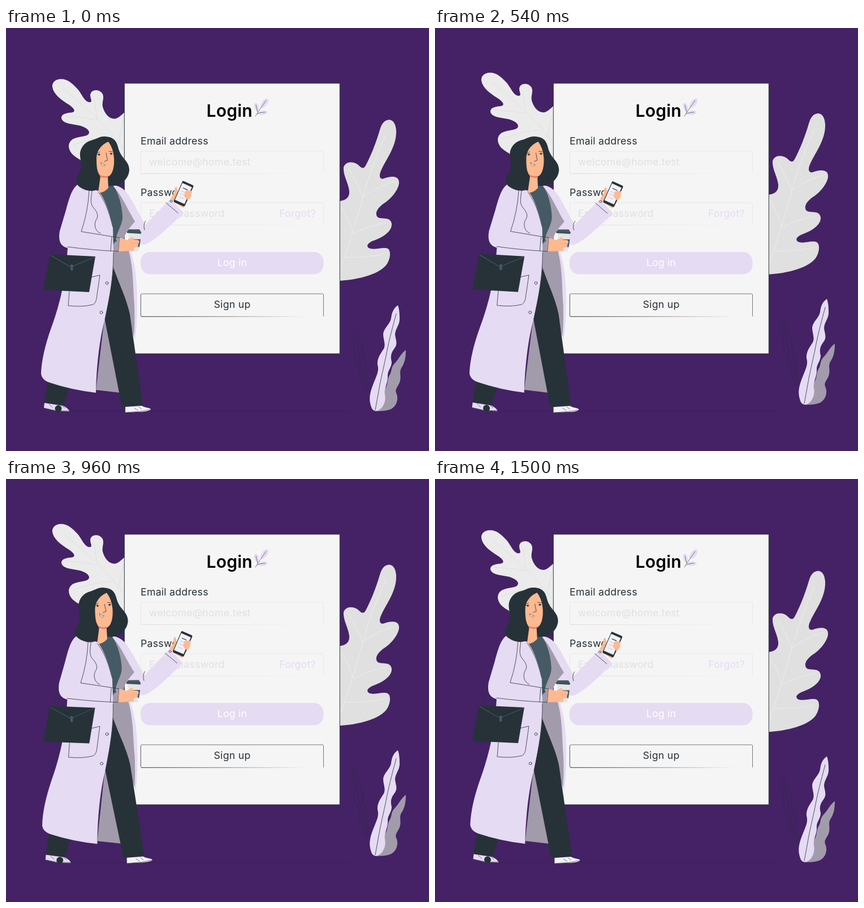
These frames come from a looping animation (748x748 px, 1540 ms). An HTML page:

```html
<!DOCTYPE html>
<html lang="en">
<head>
<meta charset="utf-8">
<title>Login</title>
<style>
  html, body { margin: 0; width: 100%; height: 100%; overflow: hidden; background: #442265; }
  svg { display: block; width: 100%; height: 100%; }
  text { font: 17.7px Inter, "Open Sans", sans-serif; letter-spacing: .25px; fill: #263238; }
  .mid { text-anchor: middle; }
  .hint { fill: #e0e0e0; }
  .lav { fill: #e5dbf2; }
  .dark { fill: #263238; }
  .teal { fill: #455a64; }
  .shade { fill: #a29bab; }
  .skin { fill: #ffb991; }
  .white { fill: #f3f1f6; }
  .line { fill: none; stroke: #263238; stroke-width: .8; stroke-linecap: round; stroke-linejoin: round; }
  .thin { stroke-width: .6; }
</style>
</head>
<body>
<svg viewBox="0 0 748 748">
  <defs>
    <linearGradient id="fadeDark" gradientUnits="userSpaceOnUse" x1="238" y1="0" x2="530" y2="0">
      <stop stop-color="#263238"/><stop offset=".45" stop-color="#777"/><stop offset="1" stop-color="#f5f5f5"/>
    </linearGradient>
    <linearGradient id="fadeLight" gradientUnits="userSpaceOnUse" x1="238" y1="0" x2="550" y2="0">
      <stop stop-color="#dcdcdc"/><stop offset="1" stop-color="#f5f5f5"/>
    </linearGradient>
    <g id="field" fill="none">
      <path d="M238.500 257V219.500Q238.500 218 240 218H560Q561.500 218 561.500 220V257" stroke="#e8e8e8"/>
      <path d="M238.500 257.500H550" stroke="url(#fadeLight)"/>
    </g>
  </defs>

  <rect width="748" height="748" fill="#442265"/>

  <g id="leaves">
    <path fill="#ebebeb" d="M97 90C88 90 81 96 82 104C84 117 97 126 109 134C119 140 125 147 117 149C108 150 98 151 98 159C100 170 119 169 133 173C145 177 151 184 144 189C135 194 113 190 111 208C111 220 121 227 130 232L170 270H220V144C207 147 203 158 194 160C183 162 174 151 171 139C169 130 175 123 170 115C164 107 150 108 149 118C149 126 154 130 148 131C139 131 134 116 126 107C117 98 110 90 97 90Z"/>
    <path fill="none" stroke="#dcdcdc" stroke-width=".8" d="M101 107Q145 142 181 180T220 240M105 156Q135 157 158 162M156 125L161 162M118 207Q155 193 187 192M208 161L198 205"/>
    <path fill="#e0e0e0" d="M677 162C668 163 664 170 661 180C654 204 645 226 636 243C632 250 628 247 623 242C616 236 601 234 597 246C596 261 605 272 607 288C608 300 600 306 585 306V447C627 445 661 434 673 418C680 408 682 391 673 389C663 387 651 393 642 389C636 385 640 380 649 376C664 371 683 360 682 346C680 332 663 339 657 334C651 327 658 317 668 310C681 302 694 286 695 274C696 259 678 262 668 266C660 268 659 260 664 250C674 229 691 208 690 181C689 168 684 162 677 162Z"/>
    <path fill="none" stroke="#ededed" d="M672 188Q645 246 631 299T592 425M605 247Q620 270 631 300M688 271Q660 278 632 298M673 344Q642 348 614 364M592 316Q608 340 614 364M670 399Q635 407 598 405"/>

    <g fill="none" stroke="#34264f">
      <path d="M614 528C608 534 616 549 616 559C616 571 614 576 621 588C628 598 622 607 629 621L637 645M614 528C624 532 621 545 627 555C633 564 629 572 632 583C637 594 639 603 637 614C636 624 644 630 646 640"/>
      <path d="M616 536Q627 594 640 642"/>
    </g>
    <path class="shade" d="M707 569C707 580 706 589 701 598C694 607 699 613 697 623C695 633 687 637 690 645C695 655 691 669 680 674Q668 678 652 677L667 640C677 634 673 623 678 614C683 607 680 600 687 593C695 585 697 577 707 569Z"/>
    <path class="lav" d="M693 490C684 496 682 505 681 513C679 524 668 530 667 541C667 551 672 558 668 567C662 576 656 584 657 595C660 605 656 613 652 623C647 635 641 650 644 663C646 672 648 677 655 677C665 675 673 661 670 648C668 637 675 629 675 617C674 605 682 601 682 590C679 579 682 573 687 566C694 557 688 549 688 541C689 530 697 524 696 512Q696 498 693 490Z"/>
    <path class="line" d="M690 505C682 535 676 557 672 580Q661 626 653 675"/>
  </g>

  <path d="M100 678H610" stroke="#3a2056"/>

  <rect x="209.300" y="97.800" width="381" height="478.200" fill="#f5f5f5" stroke="#263238"/>

  <text x="354.500" y="157" style="font-size:30px;font-weight:600;fill:#000">Login</text>
  <g class="lav">
    <ellipse cx="457" cy="133" rx="5" ry="10" transform="rotate(38 457 133)"/>
    <ellipse cx="443" cy="140" rx="4" ry="8" transform="rotate(-18 443 140)"/>
    <ellipse cx="454.500" cy="150" rx="8.500" ry="3.700" transform="rotate(-9 454 150)"/>
  </g>
  <path class="line thin" d="M441 156Q449 143 460 128M445 149L442 136M444 152Q449 149 458 149"/>

  <text x="238" y="206">Email address</text>
  <use href="#field"/>
  <text class="hint" x="253" y="242.500">welcome@home.test</text>
  <text x="238" y="296.500">Password</text>
  <use href="#field" y="91"/>
  <text class="hint" x="253" y="334">Enter password</text>
  <text x="483" y="334" style="fill:#e5dbf2">Forgot?</text>
  <rect class="lav" x="238" y="396" width="323.500" height="39.500" rx="17"/>
  <text class="mid" x="400" y="421" style="fill:#fff">Log in</text>
  <path fill="none" stroke="#777" d="M238.500 472Q238.500 470 240.500 470H559.500Q561.500 470 561.500 472V510"/>
  <path class="line" d="M238.300 472V508Q238.300 510.300 240.500 510.300"/>
  <rect x="240" y="509.800" width="290" height="1" fill="url(#fadeDark)"/>
  <text class="mid" x="400" y="495">Sign up</text>

  <g id="woman">
    <path class="line thin" d="M122 283L82 402"/>

    <!-- far arm and coat lining -->
    <path class="lav" d="M186 277C207 279 215 291 225 309L246 348L291 302L314 327C294 346 266 374 248 382C238 386 230 378 222 371L200 330Z"/>
    <path class="lav" d="M214 380C228 406 232 445 232 482Q232 525 228 552L220 520L205 430Z"/>
    <path class="shade" d="M188 279C203 291 212 316 228 342C223 349 212 358 209 372L214 384C226 420 224 452 227 490Q228 525 226 546L219 520L188 440V390L186 340Z"/>
    <path class="shade" d="M188 440L172 530L159 640L202 645L184 525Z"/>

    <!-- legs and shoes -->
    <path class="dark" d="M74 624L111 636L102 668L68 662Z"/>
    <path class="lav" d="M68 663L101 668Q111 673 112 678L88 677L67 672Z"/>
    <path class="line thin" d="M67 672L90 677H112M76 665L82 671M99 668L104 672"/>
    <circle class="dark" cx="92.500" cy="673" r="6"/>
    <path class="dark" d="M188 418C198 449 213 477 219 506L242 667L205 670L174 512Z"/>
    <path class="white" d="M211 670L240 668C246 672 256 671 256 675Q250 679 231 679L211 680Z"/>
    <path class="line thin" d="M211 680L237 678L255 675M227 672L233 676M235 670L240 674"/>

    <!-- shirt and coat front -->
    <path class="teal" d="M160 288L187 276C198 287 206 315 206 336C205 350 195 362 194 376L185 390L165 330Z"/>
    <path class="lav" d="M133 274C117 278 112 301 106 322L95 359C92 376 96 386 109 389C106 438 98 481 80 530Q63 578 62 611Q63 622 77 627Q116 640 159 645C160 600 165 550 175 515C184 470 191 435 190 398L189 352C184 328 174 299 163 288Q149 284 133 274Z"/>
    <path class="line" d="M147 288Q145 325 133 360L201 371L199 395Q155 393 109 387M152 288C151 300 148 309 154 317C161 325 165 332 159 340C155 348 158 360 167 363M163 290C181 314 185 339 189 352M187 370L185 394M190 397C190 440 184 475 175 515"/>
    <path class="line" d="M112 466L110 491Q135 494 154 489Q160 486 161 472L166 437L149 441M247 341Q242 347 245 357M283 309L304 327"/>
    <g class="line">
      <circle cx="178.500" cy="451" r="2.400"/><circle cx="168.500" cy="503" r="2.400"/>
      <circle cx="193" cy="376" r="2"/><circle cx="292" cy="306" r="2"/>
    </g>

    <!-- bag -->
    <path class="dark" d="M78 400L158 404L147 467L66 463Z"/>
    <path fill="none" stroke="#455a64" d="M79 402L110 420Q116 424 121 420L157 405"/>
    <rect class="teal" x="114" y="418" width="4.500" height="11" rx="2"/>

    <!-- cup and hand -->
    <path fill="#e6e6e6" d="M216 362H238L235 389L230 395H220Z"/>
    <path class="teal" d="M216 373.500H238L236 388H219Z"/>
    <path class="teal" d="M217 356H236L239 361L238.500 364L214 362.500V360Z"/>
    <path class="line thin" d="M214 360.500L239 361.500"/>
    <path class="skin" d="M201 371L215 375L222 370Q226 369 225 374L234 375Q237 378 234 382L233 390Q232 394 226 394L199 395Z"/>
    <path fill="none" stroke="#e99b78" stroke-width=".6" d="M222 381H234M223 388H233"/>
    <path fill="#e6e6e6" d="M226 388L236 387L234 395H227Z"/>

    <!-- phone and hand -->
    <path class="skin" d="M291 301L298 291Q297 280 302 281L304 292L322 305L313 318Q304 313 291 301Z"/>
    <g transform="rotate(24 314 292.500)">
      <rect class="dark" x="303.500" y="272.500" width="21.500" height="41" rx="2"/>
      <rect class="white" x="304.600" y="276.500" width="18.500" height="32.500"/>
      <path d="M309 284H318" stroke="#263238" stroke-width="1.200"/>
      <path d="M308 290H319M308 295H319M309 301H318" stroke="#ddd8e3" stroke-width="2"/>
    </g>
    <path class="skin" d="M317 289Q319 286 328 288Q330 291 327 293Q329 297 326 299Q325 304 319 303L315 297Z"/>

    <!-- head -->
    <path class="dark" d="M176 192C166 191 161 196 153 198C139 201 130 213 131 226C132 239 135 246 130 256C123 267 122 275 130 281C141 289 157 291 165 283L184 279C200 281 217 269 218 251C218 235 204 231 199 214C196 201 192 193 176 192Z"/>
    <path class="skin" d="M181 201C168 206 160 218 160 230C160 246 161 255 167 262L163 291Q171 293 181 283L180 263C188 260 192 247 191 230Q190 213 181 201Z"/>
    <path d="M166 260Q175 264 181 261L180 264Q173 266 166 262.500Z" fill="#e7795f"/>
    <path class="line" d="M177 221L179.500 234L174 236M160 222L166 219M182 218L188 219"/>
    <path class="line thin" style="fill:#fff" d="M168 238Q171 242 176 242Q173 246 169 242Z"/>
    <circle class="dark" cx="164.500" cy="224" r="1.600"/><circle class="dark" cx="186" cy="222.500" r="1.600"/>
    <path class="line thin" d="M161 224Q164 221 167 223M183 222Q186 220 189 222"/>
  </g>
</svg>
<script>
  const LOOP = 1540;
  const leaves = document.getElementById('leaves');
  const woman = document.getElementById('woman');
  const sway = turn => 0.7 * Math.sin(turn + 0.17);

  function draw() {
    const turn = 2 * Math.PI * (performance.now() % LOOP) / LOOP;
    const lift = turn + 0.12;
    const y = -6.7 + 6.7 * Math.cos(lift) + 0.4 * Math.cos(3 * lift);
    leaves.setAttribute('transform', `translate(0 ${y})`);
    woman.setAttribute('transform', `rotate(${sway(turn) - sway(0)} 190 445)`);
    requestAnimationFrame(draw);
  }
  draw();
</script>
</body>
</html>
```
